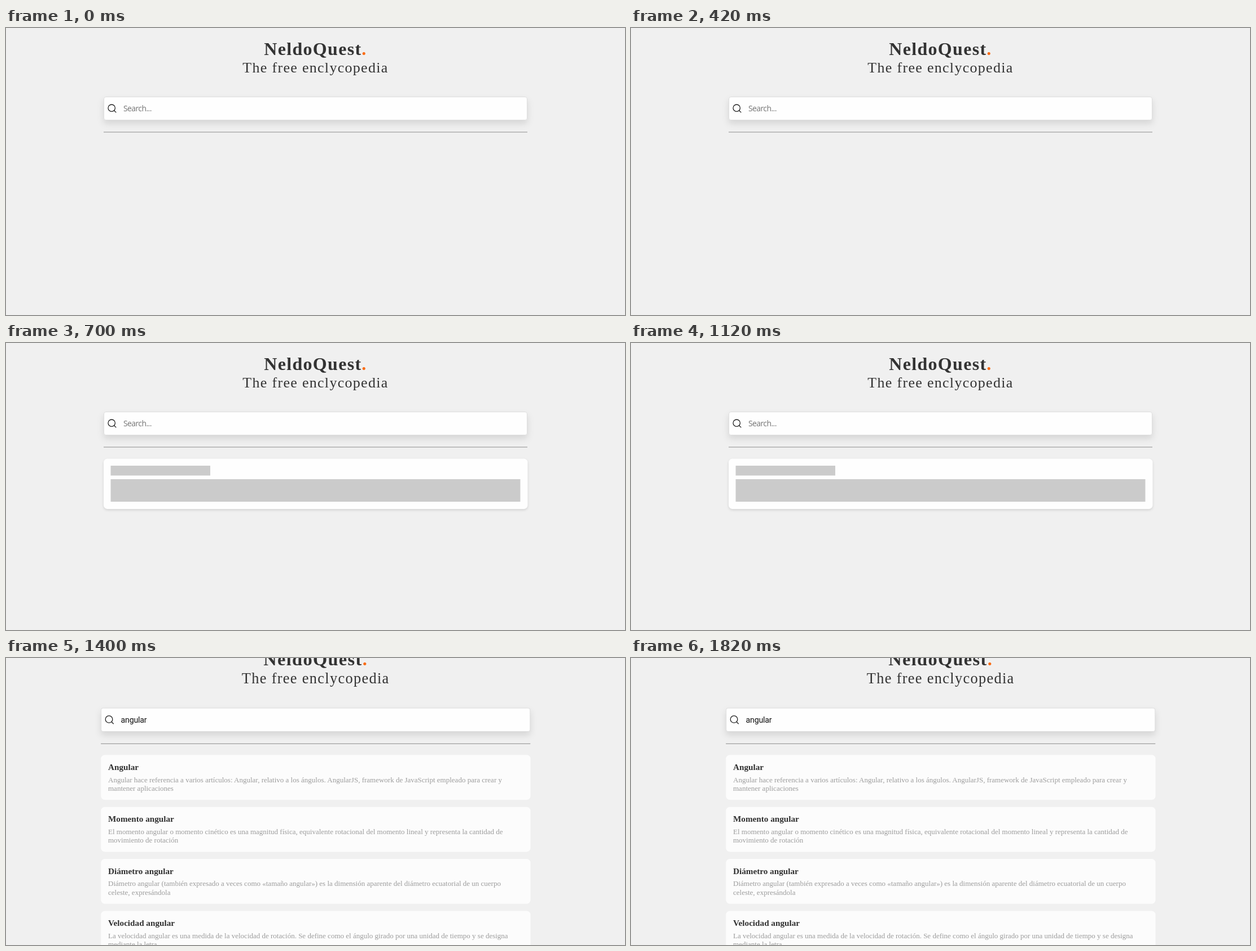
An HTML page for the animation above (2.1 s loop, 1097 by 510 pixels).

```html
<!DOCTYPE html>
<html lang="en">
<head>
<meta charset="utf-8">
<title>Encyclopedia search</title>
<style>
  html, body { margin: 0; width: 100%; height: 100%; overflow: hidden; background: #f0f0f0; }
  svg { display: block; width: 1097px; height: 510px; background: #f0f0f0; }
  text { white-space: pre; }

  .serif { font-family: "Liberation Serif", "Times New Roman", serif; }
  .brand { font-size: 32px; font-weight: 700; letter-spacing: 1.3px; fill: #333; text-anchor: middle; }
  .brand tspan { fill: #f96c14; }
  .tagline { font-size: 26px; letter-spacing: 1.3px; fill: #333; text-anchor: middle; }
  .hint { font: 14px "Open Sans", "Noto Sans", sans-serif; letter-spacing: -.6px; fill: #757575; }
  .query { font: 14px Roboto, "Liberation Sans", sans-serif; letter-spacing: -.2px; fill: #111; }
  .field { fill: #fefefe; stroke: #dedede; filter: drop-shadow(0 6px 6px rgba(0, 0, 0, .11)); }
  .icon { fill: none; stroke: #222; stroke-width: 1.3; stroke-linecap: round; }
  .rule { fill: #8c8c8c; }
  .loading-card { fill: #fefefe; filter: drop-shadow(0 2px 2px rgba(0, 0, 0, .12)); }
  .bone { fill: #cbcbcb; }
  .card { fill: #fcfcfc; }
  .card-title { font-size: 15.2px; font-weight: 700; fill: #303030; }
  .card-text { font-size: 13px; fill: #9c9c9c; }

  .page, .empty, .loading, .done { animation: 2100ms step-end infinite; }
  .page { animation-name: scroll; }
  .empty { animation-name: empty; }
  .loading { animation-name: loading; }
  .done { animation-name: done; }

  @keyframes scroll {
    0% { transform: none; }
    66.6666%, 100% { transform: translate(-7.2px, -35.2px) scale(1.0135); }
  }
  @keyframes empty {
    0% { visibility: visible; }
    66.6666%, 100% { visibility: hidden; }
  }
  @keyframes loading {
    0% { visibility: hidden; }
    33.3333% { visibility: visible; }
    66.6666%, 100% { visibility: hidden; }
  }
  @keyframes done {
    0% { visibility: hidden; }
    66.6666%, 100% { visibility: visible; }
  }
</style>
</head>
<body>
<svg viewBox="0 0 1097 510" xmlns="http://www.w3.org/2000/svg">
  <g class="page">
    <g class="serif">
      <text class="brand" x="548.5" y="47.5">NeldoQuest<tspan>.</tspan></text>
      <text class="tagline" x="548.5" y="79">The free enclycopedia</text>
    </g>
    <rect class="field" x="173.5" y="122.5" width="750" height="41" rx="3.5"/>
    <g class="icon">
      <circle cx="187.2" cy="142.2" r="6.2"/>
      <path d="M191.7 146.7 L194.9 149.9"/>
    </g>
    <text class="hint empty" x="208" y="148">Search...</text>
    <text class="query done" x="208" y="147.8">angular</text>
    <rect class="rule" x="173" y="184.5" width="751" height="1"/>
  </g>

  <g class="loading">
    <rect class="loading-card" x="173" y="205.5" width="751.5" height="89.5" rx="7"/>
    <rect class="bone" x="185.5" y="218" width="176.5" height="17.5"/>
    <rect class="bone" x="185.5" y="242" width="726" height="40"/>
  </g>

  <g class="done serif">
    <g>
      <rect class="card" x="168.2" y="172.3" width="761.4" height="79.7" rx="7"/>
      <text class="card-title" x="181" y="198.8">Angular</text>
      <text class="card-text" x="181" y="220.6">Angular hace referencia a varios artículos: Angular, relativo a los ángulos. AngularJS, framework de JavaScript empleado para crear y</text>
      <text class="card-text" x="181" y="236">mantener aplicaciones</text>
    </g>
    <g transform="translate(0 92.4)">
      <rect class="card" x="168.2" y="172.3" width="761.4" height="79.7" rx="7"/>
      <text class="card-title" x="181" y="198.8">Momento angular</text>
      <text class="card-text" x="181" y="220.6">El momento angular o momento cinético es una magnitud física, equivalente rotacional del momento lineal y representa la cantidad de</text>
      <text class="card-text" x="181" y="236">movimiento de rotación</text>
    </g>
    <g transform="translate(0 184.8)">
      <rect class="card" x="168.2" y="172.3" width="761.4" height="79.7" rx="7"/>
      <text class="card-title" x="181" y="198.8">Diámetro angular</text>
      <text class="card-text" x="181" y="220.6">Diámetro angular (también expresado a veces como «tamaño angular») es la dimensión aparente del diámetro ecuatorial de un cuerpo</text>
      <text class="card-text" x="181" y="236">celeste, expresándola</text>
    </g>
    <g transform="translate(0 277.2)">
      <rect class="card" x="168.2" y="172.3" width="761.4" height="79.7" rx="7"/>
      <text class="card-title" x="181" y="198.8">Velocidad angular</text>
      <text class="card-text" x="181" y="220.6">La velocidad angular es una medida de la velocidad de rotación. Se define como el ángulo girado por una unidad de tiempo y se designa</text>
      <text class="card-text" x="181" y="236">mediante la letra</text>
    </g>
  </g>
</svg>
</body>
</html>
```
